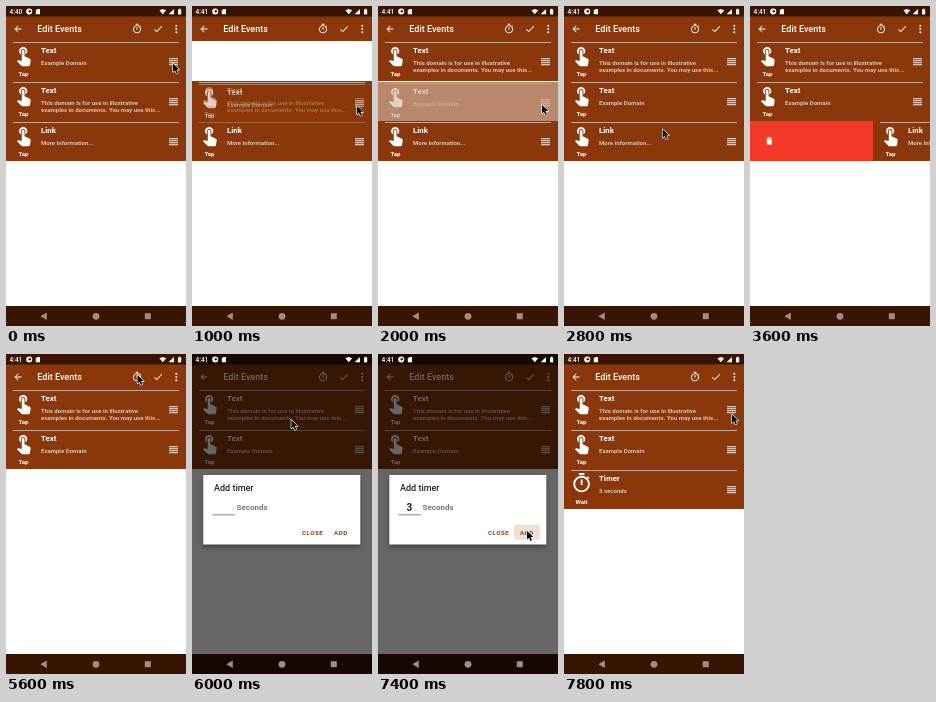
These frames come from a looping animation (180 px wide and 320 px high, 8 s). An HTML page with a canvas:

```html
<!DOCTYPE html>
<html lang="en">
<head>
<meta charset="utf-8">
<title>Edit Events</title>
<style>
  html, body { margin: 0; width: 100%; height: 100%; overflow: hidden; background: #fff; }
  canvas { display: block; width: 100vw; height: 100vh; }
</style>
</head>
<body>
<canvas id="stage"></canvas>
<script>
const W = 180, H = 320, LOOP = 8000, STEP = 200;
const BROWN = '#8a380b', DARK = '#381503', RED = '#f23a29', MUTED = '#dac2b4';
const LIST_TOP = 35, ROW_H = 40;

const canvas = document.getElementById('stage');
const ctx = canvas.getContext('2d');
const ratio = window.devicePixelRatio || 1;
canvas.width = W * ratio;
canvas.height = H * ratio;

// Icons on a 24 unit grid
const ICON = {
  tap: new Path2D('M9 11.24V7.5C9 6.12 10.12 5 11.5 5S14 6.12 14 7.5v3.74c1.21-.81 2-2.18 2-3.74C16 5.01 13.99 3 11.5 3S7 5.01 7 7.5c0 1.56.79 2.93 2 3.74z' +
    'm9.84 4.63l-4.54-2.26c-.17-.07-.35-.11-.54-.11H13v-6c0-.83-.67-1.5-1.5-1.5S10 6.67 10 7.5v10.74l-3.43-.72c-.4-.05-.8.07-1.03.3l-.79.8 4.94 4.94c.27.27.65.44 1.06.44h6.79c.75 0 1.33-.55 1.44-1.28l.75-5.27c.06-.7-.3-1.36-.89-1.58z'),
  timer: new Path2D('M15 1H9v2h6V1zm-4 13h2V8h-2v6zm8.03-6.61l1.42-1.42c-.43-.51-.9-.99-1.41-1.41l-1.42 1.42C16.07 4.74 14.12 4 12 4c-4.97 0-9 4.03-9 9s4.02 9 9 9 9-4.03 9-9c0-2.12-.74-4.07-1.97-5.61z' +
    'M12 20c-3.87 0-7-3.13-7-7s3.13-7 7-7 7 3.13 7 7-3.13 7-7 7z'),
  back: new Path2D('M20 11H7.8l5.6-5.6L12 4l-8 8 8 8 1.4-1.4L7.8 13H20z'),
  check: new Path2D('M9 16.2L4.8 12l-1.4 1.4L9 19 21 7l-1.4-1.4z'),
  trash: new Path2D('M6 19c0 1.1.9 2 2 2h8c1.1 0 2-.9 2-2V7H6zM19 4h-3.5l-1-1h-5l-1 1H5v2h14z'),
  cursor: new Path2D('M0 0V9.4L2.2 7.4L3.8 11L5.5 10.2L3.9 6.8H7z')
};

const EXAMPLE = { title: 'Text', lines: ['Example Domain'], icon: 'tap', label: 'Tap' };
const DOMAIN = {
  title: 'Text', icon: 'tap', label: 'Tap',
  lines: ['This domain is for use in illustrative', 'examples in documents. You may use this...']
};
const LINK = { title: 'Link', lines: ['More information...'], icon: 'tap', label: 'Tap' };
const TIMER = { title: 'Timer', lines: ['3 seconds'], icon: 'timer', label: 'Wait' };

// Pointer path: time, x, y
const POINTER = [
  [0, 167, 57.5], [400, 167, 58], [800, 165, 92], [1000, 165, 100], [2000, 164, 99],
  [2400, 164, 98], [3000, 66, 136], [3600, 189, 138], [4400, 186, 110],
  [5400, 131, 21], [5800, 132, 21], [6400, 34, 156], [6800, 36, 157],
  [7200, 148, 178], [7400, 149, 177], [7600, 150, 174], [7800, 168, 60.5]
];

function tween(keys, t, col) {
  const i = keys.findIndex(k => k[0] > t);
  if (i < 0) return keys[keys.length - 1][col];
  if (i === 0) return keys[0][col];
  const a = keys[i - 1], b = keys[i];
  return a[col] + (b[col] - a[col]) * (t - a[0]) / (b[0] - a[0]);
}

function rect(x, y, w, h, fill) {
  ctx.fillStyle = fill;
  ctx.fillRect(x, y, w, h);
}

function disc(x, y, r, fill) {
  ctx.fillStyle = fill;
  ctx.beginPath();
  ctx.arc(x, y, r, 0, Math.PI * 2);
  ctx.fill();
}

function poly(points, fill) {
  ctx.fillStyle = fill;
  ctx.beginPath();
  points.forEach(([x, y]) => ctx.lineTo(x, y));
  ctx.fill();
}

function text(str, x, y, size, fill, weight = 700, align = 'left', spacing = 0) {
  ctx.font = `${weight} ${size}px Roboto, sans-serif`;
  ctx.letterSpacing = spacing + 'px';
  ctx.textAlign = align;
  ctx.fillStyle = fill;
  ctx.fillText(str, x, y);
}

function icon(name, cx, cy, size, fill = '#fff') {
  ctx.save();
  ctx.translate(cx - size / 2, cy - size / 2);
  ctx.scale(size / 24, size / 24);
  ctx.fillStyle = fill;
  ctx.fill(ICON[name], 'evenodd');
  ctx.restore();
}

function row(item, y, x = 0, alpha = 1) {
  ctx.save();
  ctx.translate(x, y);
  ctx.globalAlpha = alpha;
  rect(0, 0, W, ROW_H, BROWN);
  rect(7, 1, 166, 1, '#cba994');
  icon(item.icon, 17.6, 14.2, 22);
  text(item.label, 17.5, 35, 6.1, '#fff', 700, 'center');
  text(item.title, 35, 12.2, 7.8, '#fff');
  item.lines.forEach((line, i) => text(line, 35, 24.1 + i * 7.2, 6.05, MUTED));
  for (let i = 0; i < 4; i++) rect(163, 17 + i * 2, 9, 1.3, MUTED);
  ctx.restore();
}

const slot = i => LIST_TOP + i * ROW_H;

function list(t) {
  if (t < 2400) {
    const dragging = t >= 400;
    const offset = dragging ? tween(POINTER, t, 2) - 58 : 0;
    const swap = Math.min(1, Math.max(0, (t - 1000) / 400));
    row(DOMAIN, slot(1 - swap));
    row(LINK, slot(2));
    row(EXAMPLE, slot(0) + offset, 0, dragging ? 0.6 : 1);
    return;
  }
  row(DOMAIN, slot(0));
  row(EXAMPLE, slot(1));
  if (t < 4000) {
    const swipe = t < 3000 ? 0 : t < 3800 ? tween(POINTER, t, 1) - 66 : W;
    if (swipe > 0) {
      rect(0, slot(2), W, ROW_H, RED);
      icon('trash', 19.3, slot(2) + 20, 10);
    }
    row(LINK, slot(2), swipe);
  }
  if (t >= 7800) row(TIMER, slot(2));
}

function appBar() {
  rect(0, 0, W, LIST_TOP, BROWN);
  icon('back', 12, 23, 10.5);
  text('Edit Events', 31.3, 26.4, 9, '#fff', 500);
  icon('timer', 131, 22.8, 10.8);
  icon('check', 152, 23, 10.8);
  [19.8, 23, 26.2].forEach(y => disc(170.3, y, 0.95, '#fff'));
}

function statusBar(t) {
  text(t < 600 ? '4:40' : '4:41', 3.5, 8, 6.5, '#fff', 500);
  disc(23.2, 5.6, 3, '#fff');
  disc(23.8, 5.2, 1.2, DARK);
  poly([[29.8, 4.6], [31.3, 3], [34, 3], [34, 8.2], [29.8, 8.2]], '#fff');
  poly([[156.8, 8.2], [153.4, 4.2], [156.8, 2.9], [160.2, 4.2]], '#fff');
  poly([[162.6, 8.2], [168, 2.9], [168, 8.2]], '#fff');
  rect(172, 3.4, 3.2, 5, '#fff');
  rect(172.9, 2.7, 1.4, 1, '#fff');
}

function navBar() {
  const grey = '#a38d83';
  poly([[34.3, 310.3], [40.8, 306.5], [40.8, 314.1]], grey);
  disc(90, 310.3, 3.4, grey);
  rect(138.8, 307.2, 6, 6, grey);
}

function dialog(t) {
  ctx.save();
  ctx.globalAlpha = t < 6000 ? 0.6 : 1;
  rect(0, 0, W, H, 'rgba(0,0,0,.6)');
  ctx.shadowColor = 'rgba(0,0,0,.4)';
  ctx.shadowBlur = 5 * ratio;
  ctx.shadowOffsetY = 2 * ratio;
  rect(11.3, 121, 157, 69.5, '#fff');
  ctx.shadowColor = 'transparent';
  text('Add timer', 22, 137.4, 9, '#212121', 500);
  if (t >= 6600) text('3', 31.4, 156.8, 10, '#212121', 700, 'center');
  rect(20.3, 160.4, 22.6, 0.9, '#777');
  text('Seconds', 44.6, 156.2, 8, '#737373');
  if (t >= 7400) {
    ctx.fillStyle = '#efe1d8';
    ctx.beginPath();
    ctx.roundRect(136, 170.5, 26, 15.5, 2);
    ctx.fill();
  }
  text('CLOSE', 110, 180.8, 6.2, BROWN, 700, 'left', 0.5);
  text('ADD', 142, 180.8, 6.2, BROWN, 700, 'left', 0.5);
  ctx.restore();
}

function pointer(t) {
  ctx.save();
  ctx.translate(tween(POINTER, t, 1), tween(POINTER, t, 2));
  ctx.scale(0.9, 0.9);
  ctx.lineWidth = 1.4;
  ctx.lineJoin = 'round';
  ctx.strokeStyle = '#fff';
  ctx.stroke(ICON.cursor);
  ctx.fillStyle = '#000';
  ctx.fill(ICON.cursor);
  ctx.restore();
}

function draw(t) {
  ctx.setTransform(ratio, 0, 0, ratio, 0, 0);
  rect(0, 0, W, H, '#fff');
  list(t);
  appBar();
  rect(0, 0, W, 10.5, DARK);
  rect(0, 300, W, 20, DARK);
  if (t >= 5800 && t < 7600) dialog(t);
  statusBar(t);
  navBar();
  pointer(t);
}

const start = performance.now();
function tick() {
  const t = (performance.now() - start) % LOOP;
  draw(Math.floor(t / STEP) * STEP);
  requestAnimationFrame(tick);
}
tick();
</script>
</body>
</html>
```
